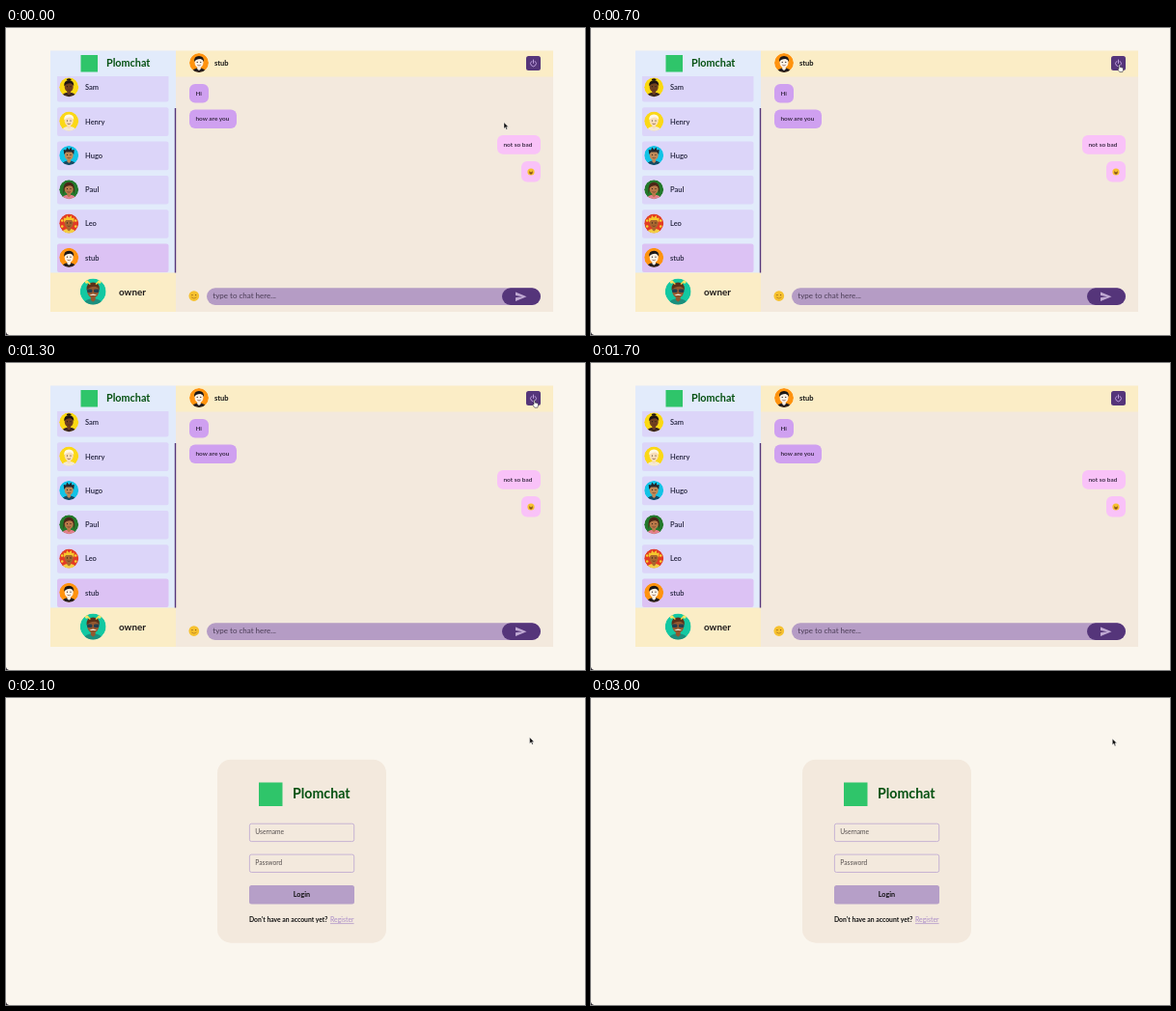
An HTML page that plays this animation: 600 by 318 pixels, repeating every 3200 ms.

```html
<!DOCTYPE html>
<html lang="en">
<head>
<meta charset="utf-8">
<title>Plomchat</title>
<style>
  html, body { margin: 0; width: 100%; height: 100%; overflow: hidden; background: #faf6ee; }
  svg { display: block; width: 100vw; height: 100vh; font-family: Lato, sans-serif; font-weight: 600; }
</style>
</head>
<body>
<svg viewBox="0 0 600 318">
  <defs>
    <clipPath id="disc"><circle r="10"/></clipPath>
    <clipPath id="list"><rect x="46" y="50" width="130" height="203.5"/></clipPath>
  </defs>
  <g id="chat"></g>
  <g id="login"></g>
  <g id="status">
    <rect x="-4" y="309" width="208.5" height="13" rx="2" fill="#d3b5c9"/>
    <rect x="-4" y="309.7" width="207.7" height="13" rx="2" fill="#f0cbe2"/>
    <text x="2" y="315.8" font-size="5.3" font-weight="400" font-family="Liberation Sans, Arial, sans-serif" fill="#33232e">Waiting for cdn.jsdelivr.net...</text>
  </g>
  <path d="M0 315Q.4 317.5 3 318H0Z" fill="#2b2730"/>
  <path id="arrow" d="M0 0V6.4L1.5 5L2.5 7.5L3.6 7L2.6 4.6H4.6Z" fill="#111" stroke="#fff" stroke-width=".4"/>
  <path id="hand" d="M0 .6Q.7-.4 1.3.6V3Q2 2.6 2.4 3.2Q3.2 2.8 3.5 3.5Q4.4 3.3 4.5 4.2V5.8L3.8 8H.8L-1.4 5Q-1.2 4 0 4.9Z" fill="#fff" stroke="#1b1624" stroke-width=".55"/>
</svg>
<script>
const $ = id => document.getElementById(id);
const box = (x, y, w, h, fill, r = 0, more = '') =>
  `<rect x="${x}" y="${y}" width="${w}" height="${h}" rx="${r}" fill="${fill}" ${more}/>`;
const text = (x, y, size, str, fill = '#222', more = '') =>
  `<text x="${x}" y="${y}" font-size="${size}" fill="${fill}" ${more}>${str}</text>`;
const path = (d, fill, more = '') => `<path d="${d}" fill="${fill}" ${more}/>`;
const line = (d, color, w) => path(d, 'none', `stroke="${color}" stroke-width="${w}" stroke-linecap="round"`);
const dot = (x, y, r, fill) => `<circle cx="${x}" cy="${y}" r="${r}" fill="${fill}"/>`;
const bold = 'font-weight="700"', plain = 'font-weight="400"';

const crop = 'M-5-1Q-5.5-7 0-7Q5.5-7 5-1Q4-3.5 1.5-4Q-3-4-5-1Z';
const spikes = 'M-5-1L-5.5-6L-3-5.5L-2-8.5L0-6L2.5-8.5L3-5.5L5.5-6L5-1L3-3.5H-3Z';
const long = 'M-5.5 5Q-7-7 0-7.5Q7-7 5.5 5L4-2Q0-5-4-2Z';
// background, skin, hair, shirt, haircut
const people = {
  Sam: ['#fbd912', '#70401f', '#1d1310', '#3a2620', crop + 'M-2.6-7a2.6 2 0 0 1 5.2 0Z'],
  Henry: ['#fbd816', '#f8deb9', '#fff8e6', '#f4ead2', crop],
  Hugo: ['#12c3e6', '#c08a58', '#25262b', '#174a63', spikes],
  Paul: ['#24792c', '#b97848', '#4b2617', '#e57f8d', long],
  Leo: ['#e23b25', '#a9672f', '#f6c62c', '#f4cf45', spikes],
  stub: ['#ff930f', '#fdf1e4', '#1b1717', '#241e1e', crop],
  owner: ['#13c8a2', '#94582f', '#5b3019', '#1b8f7d', crop]
};

function avatar(name, x, y, r = 10) {
  const [bg, skin, hair, shirt, cut] = people[name];
  let extra = '';
  if (name === 'owner') extra =
    line('M-2.5-6L-4.5-8M2.5-6L4.5-8', '#f2d34b', 1.2) + dot(-5, -7.5, 1.3, '#f7e66a') + dot(5, -7.5, 1.3, '#f7e66a') +
    box(-4.6, -1.9, 4, 2.7, '#273d4d', 1) + box(.6, -1.9, 4, 2.7, '#273d4d', 1) +
    path('M-3 3Q0 .6 3 3Q0 2.8-3 3', '#f1e6d5');
  if (name === 'Leo') extra = [-7, 7].map(p => dot(p, -3, 1.3, '#f7d331') + dot(p, 3, 1.3, '#f7d331')).join('');
  return `<g transform="translate(${x} ${y}) scale(${r / 10})" clip-path="url(#disc)">` +
    dot(0, 0, 10, bg) + path('M-8 11Q-7 5.5 0 5.5Q7 5.5 8 11Z', shirt) + path('M-1.8 3H1.8V6.5L0 8L-1.8 6.5Z', skin) +
    (cut === long ? path(cut, hair) : '') +
    `<ellipse cy="-.4" rx="4.5" ry="5.4" fill="${skin}"/>` + path(cut === long ? crop : cut, hair) +
    dot(-1.8, -.6, .6, '#221a18') + dot(1.8, -.6, .6, '#221a18') + line('M-1.3 2.6Q0 3.6 1.3 2.6', '#5a2b22', .6) +
    extra + '</g>';
}

const smiley = (x, y, r, mouth) => `<g transform="translate(${x} ${y}) scale(${r})">` + dot(0, 0, 1, '#f6c12f') +
  dot(-.35, -.2, .12, '#7a4c14') + dot(.35, -.2, .12, '#7a4c14') + mouth + '</g>';
const smile = line('M-.45 .3Q0 .7 .45 .3', '#a8701c', .12);
const laugh = path('M-.6 .1H.6Q.4 .75 0 .75Q-.4 .75-.6 .1Z', '#86501a');

const bubble = (x, y, w, h, fill, str) => box(x, y, w, h, fill, 6) + text(x + 6.4, y + 11.8, 6.5, str, '#2d2038');

const row = (name, i) => {
  const y = 47 + i * 35.3;
  return box(53, y, 115.5, 29.6, name === 'stub' ? '#dcc2f4' : '#dcd5f9', 2) +
    avatar(name, 65.2, y + 14.3) + text(82, y + 17.2, 7.5, name, '#20203a');
};

$('chat').innerHTML =
  box(46, 23.5, 130, 270.5, '#e2ebfb') + box(176, 50, 391, 244, '#f3e9dd') +
  box(176, 23.5, 391, 27, '#fbedc6') + box(46, 253.5, 130, 40.5, '#fbedc6') +
  box(77.5, 28, 17.5, 17.5, '#2fc56a') + text(104, 40, 10.8, 'Plomchat', '#045010', bold) +
  '<g clip-path="url(#list)">' + ['Sam', 'Henry', 'Hugo', 'Paul', 'Leo', 'stub'].map(row).join('') + '</g>' +
  box(174.8, 83, 1.4, 170.5, '#56367b') +
  avatar('owner', 90.2, 273, 13.4) + text(117, 276.7, 9.8, 'owner', '#1d1a1a', bold) +
  avatar('stub', 200, 36) + text(216, 39, 7.5, 'stub', '#111', bold) +
  box(539, 29, 15, 15, '#55357a', 2.5) + line('M544.7 34.5a2.9 2.9 0 1 0 3.6 0M546.5 33V36.4', '#d5b5f3', .8) +
  bubble(190, 58, 20, 19.5, '#cfa0f0', 'Hi') + bubble(190, 84.5, 49, 19.5, '#cfa0f0', 'how are you') +
  bubble(509, 111, 45, 19.7, '#f9c2f8', 'not so bad') + box(534, 138, 20, 21.5, '#f9c2f8', 6) +
  smiley(544, 149, 3.6, laugh) + smiley(194.8, 277.6, 5.3, smile) +
  box(208, 269.3, 346, 17.6, '#b59cc5', 8.8) + text(214.3, 280.3, 8, 'type to chat here...', '#4b3d56', plain) +
  box(514, 269.3, 40, 17.6, '#55357a', 8.8) + path('M528 273.5L539.5 278.2L528 283V279.3L535 278.2L528 277.1Z', '#c0a9d3');

const field = (y, str) => box(252.4, y, 108.3, 18.4, 'none', 2, 'stroke="#b8a2d0" stroke-width=".75"') +
  text(258.3, y + 11.1, 6.7, str, '#57504f', plain);

$('login').innerHTML =
  box(219, 63.7, 175, 190, '#f3e9dd', 14) +
  box(262, 87.5, 24.5, 24.5, '#2fc56a') + text(297, 103.9, 14.2, 'Plomchat', '#045010', bold) +
  field(130.2, 'Username') + field(162.1, 'Password') +
  box(252, 193.9, 109, 19.7, '#b69fc8', 2.5) + text(306.5, 206.2, 7.2, 'Login', '#111', bold + ' text-anchor="middle"') +
  text(252, 232.4, 6.8, "Don't have an account yet?", '#111', bold) +
  text(336, 232.4, 6.9, 'Register', '#a98bc8', plain + ' text-decoration="underline"');

const show = (id, on) => $(id).setAttribute('display', on ? 'inline' : 'none');
const ease = (t, from, to) => {
  const k = Math.min(1, Math.max(0, (t - from) / (to - from)));
  return k * k * (3 - 2 * k);
};
const LOGOUT = 1800;

function draw() {
  const t = Math.floor(performance.now() % 3200 / 100) * 100;
  const out = t >= LOGOUT;
  const go = ease(t, 0, 600), back = ease(t, LOGOUT, 2300);
  const x = 516 + 31 * go - 6.7 * back;
  const y = 97.8 - 60.2 * go + ease(t, 700, 1000) * .6 + 4 * back;
  const over = !out && x > 539 && y < 44;
  show('chat', !out);
  show('login', out);
  show('status', out && t < 2000);
  show('hand', over && t < 1500);
  show('arrow', !over);
  for (const id of ['hand', 'arrow']) $(id).setAttribute('transform', `translate(${x} ${y})`);
  requestAnimationFrame(draw);
}
draw();
</script>
</body>
</html>
```
